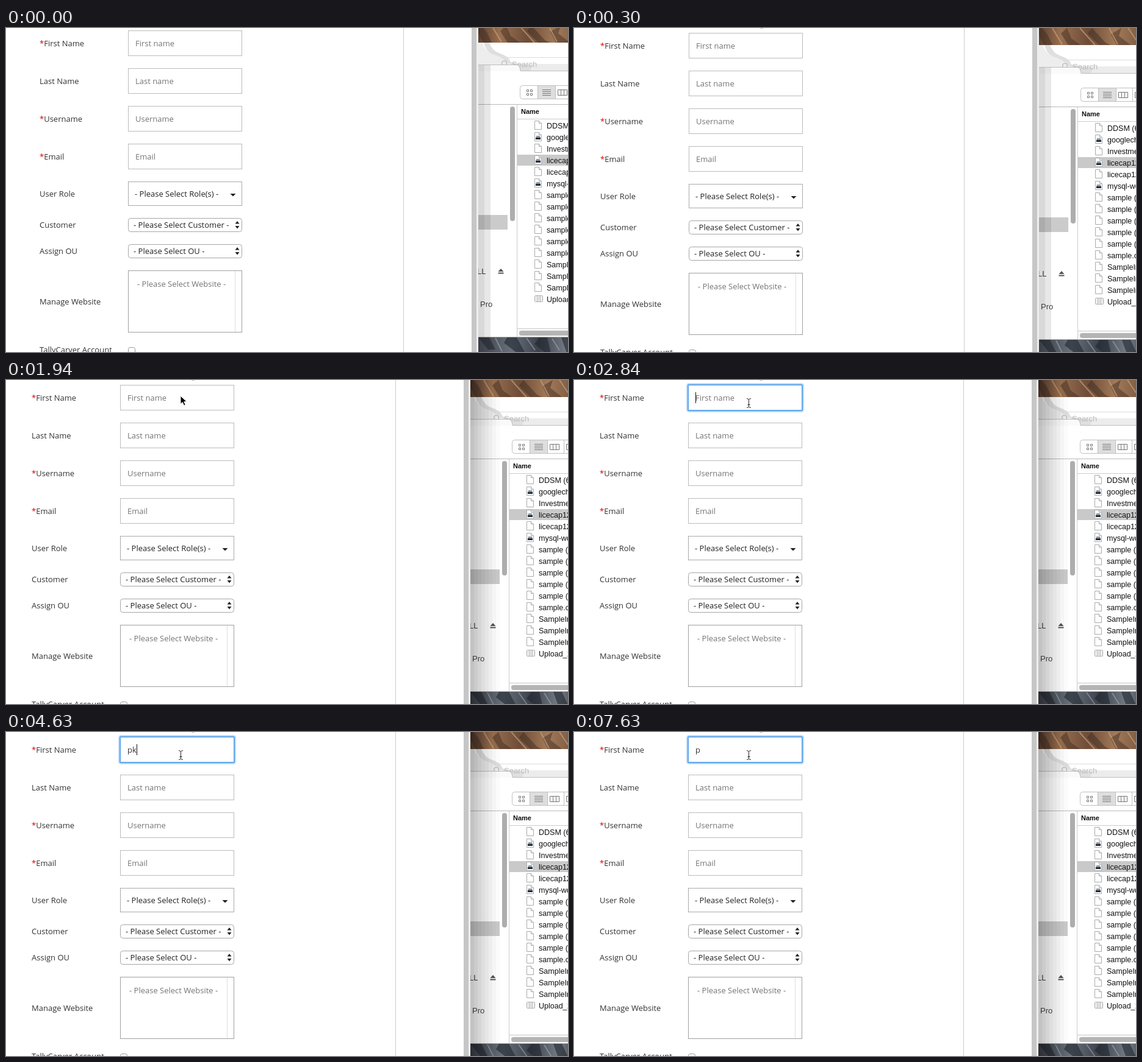
Animation of 921 by 532 pixels, one loop 8 s. Source, as an HTML page:

```html
<!DOCTYPE html>
<html lang="en">
<head>
<meta charset="utf-8">
<title>User form</title>
<style>
  html, body { margin: 0; width: 100%; height: 100%; overflow: hidden; background: #fff; }
  svg { display: block; width: 921px; height: 532px; }
  text { font: 13px "Open Sans", sans-serif; fill: #333; white-space: pre; }
  .hint { fill: #757575; }
  .dark { fill: #222; }
  .finder text { font: 12.5px "Liberation Sans", Arial, sans-serif; fill: #111; }
  .line { fill: none; stroke: #bcbcbc; }
  .anim { animation: 8s step-end infinite; }

  #scene { animation-name: settle; }
  @keyframes settle {
    0% { transform: translate(13px, -4px); }
    1.875% { transform: translate(2px, -1px); }
    3.75% { transform: translate(1px, 0); }
    13.125%, 100% { transform: none; }
  }
  #arrow { animation-name: approach; }
  @keyframes approach {
    0% { opacity: 0; transform: translate(296px, -5px); }
    18.75% { opacity: 1; transform: translate(296px, -5px); }
    20.625% { opacity: 1; transform: translate(289px, 17px); }
    22.5% { opacity: 1; transform: translate(285px, 25px); }
    29.875%, 100% { opacity: 0; transform: translate(285px, 25px); }
  }
  #beam { animation-name: beam; }
  @keyframes beam { 0% { opacity: 0; } 29.875%, 100% { opacity: 1; } }
  #ring { animation-name: ring; }
  @keyframes ring { 0% { opacity: 0; } 35.5%, 100% { opacity: 1; } }
  #idle { animation-name: idle; }
  @keyframes idle { 0% { opacity: 1; } 24.25%, 100% { opacity: 0; } }
  #active { animation-name: active; }
  @keyframes active { 0% { opacity: 0; } 24.25%, 100% { opacity: 1; } }

  #empty { animation-name: empty; }
  @keyframes empty { 0%, 78.5% { opacity: 1; } 56%, 87.875%, 100% { opacity: 0; } }
  #first { animation-name: first; }
  @keyframes first { 0%, 78.5% { opacity: 0; } 56%, 87.875%, 100% { opacity: 1; } }
  #second { animation-name: second; }
  @keyframes second { 0%, 71%, 100% { opacity: 0; } 57.875% { opacity: 1; } }
  #caret { animation-name: caret; }
  @keyframes caret {
    0%, 41.125%, 54.125%, 84.125% { opacity: 0; transform: none; }
    35.5%, 48.625%, 78.5% { opacity: 1; transform: none; }
    56%, 71%, 87.875% { opacity: 1; transform: translateX(8px); }
    57.875% { opacity: 1; transform: translateX(15px); }
    65.375%, 76.625%, 95.375%, 100% { opacity: 0; transform: none; }
  }
</style>
</head>
<body>
<svg viewBox="0 0 921 532">
  <defs>
    <linearGradient id="rock">
      <stop offset="0" stop-color="#5b4030"/><stop offset=".2" stop-color="#9a7050"/>
      <stop offset=".45" stop-color="#6d4c38"/><stop offset=".7" stop-color="#a27a58"/>
      <stop offset="1" stop-color="#70503c"/>
    </linearGradient>
    <linearGradient id="slate">
      <stop offset="0" stop-color="#3a3d45"/><stop offset=".3" stop-color="#69717c"/>
      <stop offset=".55" stop-color="#3b414b"/><stop offset=".8" stop-color="#747b85"/>
      <stop offset="1" stop-color="#40454e"/>
    </linearGradient>
    <g id="page">
      <path d="M.5 .5h7l4 4v10h-11z" fill="#fff" stroke="#aaa"/>
      <path d="M7.5 .5v4h4" fill="#eee" stroke="#aaa"/>
    </g>
    <g id="disk">
      <use href="#page"/>
      <path d="M3 6h6l1 4H2z" fill="#8b98a6"/><path d="M2 9h8v3H2z" fill="#222c38"/>
    </g>
    <g id="archive">
      <rect x=".5" y="2.5" width="13" height="10" rx="1" fill="#f0f0f0" stroke="#aaa"/>
      <path d="M4.5 3v9M7 4v7M9.5 3v9" stroke="#bbb"/>
    </g>
    <path id="steps" d="M-3.5 -2L0 -6.5L3.5 -2zM-3.5 1.5L0 6L3.5 1.5z" fill="#222"/>
  </defs>

  <g id="scene" class="anim">
    <g class="finder">
      <g>
        <rect x="761" y="-4" width="180" height="32" fill="url(#rock)"/>
        <path d="M766 0l9 11 8 17h-14l-8-16V0zM807 0l7 17 15 11h-20L797 9zM848 0l22 24 8 4h-19l-18-19zM896 0l-4 13 19 15h-23l-9-18z" fill="#3a2820" opacity=".45"/>
        <path d="M783 0l16 27M828 0l25 28M876 0l14 27M907 0l14 21" fill="none" stroke="#d0aa82" stroke-width="2" opacity=".6"/>
        <rect x="761" y="512" width="180" height="30" fill="url(#slate)"/>
        <path d="M761 512l16 20h12l-10-20zM808 512l-5 9 22 17h13l-14-26zM861 512l-8 11 19 15h8l-6-26zM897 512l9 26h17l-12-26z" fill="#20252d" opacity=".6"/>
        <path d="M789 513l11 22M840 513l14 20M882 514l12 19" fill="none" stroke="#a4abb3" stroke-width="2" opacity=".55"/>
      </g>

      <rect x="761" y="28" width="180" height="484" fill="#fff"/>
      <rect x="808" y="63" width="133" height="11" fill="#ececec"/>
      <path d="M761 28H768Q771 42 786 47Q801 50 808 60Q824 66 830 74H761z" fill="#ededed"/>
      <path d="M770 28H779Q784 42 797 46Q811 50 814 60Q832 64 850 65L846 74H830Q824 65 808 61Q799 50 784 47Q773 42 770 28z" fill="#dfdfdf"/>
      <path d="M808 52.5H941" stroke="#ddd"/>
      <circle cx="803.5" cy="62" r="4" fill="none" stroke="#aaa"/><path d="M806.5 65l3 4" stroke="#aaa"/>
      <text x="816" y="68" style="font-size:13px;fill:#bcbcbc">Search</text>
      <path d="M761 64.5H824Q829 65 830 74V130H761z" fill="#fafafa"/>
      <path d="M761 64.5H824Q829.500 65 830 74.500H941" class="line"/>
      <rect x="761" y="75" width="180" height="437" fill="#fff"/>

      <rect x="829.5" y="98.500" width="120" height="22" rx="4" fill="#fff" stroke="#c0c0c0"/>
      <path d="M858.500 99v21M887.500 99v21M914.500 99v21" stroke="#c0c0c0"/>
      <rect x="859" y="99" width="28" height="21" fill="#dedede"/>
      <path d="M840.500 105.500h3v3h-3zM846.500 105.500h3v3h-3zM840.500 111.500h3v3h-3zM846.500 111.500h3v3h-3zM891.500 105.500h15v9h-15zM896.500 105v10M901.500 105v10M918.500 105.500h9v9h-9z" fill="none" stroke="#777"/>
      <path d="M866 105.500h14M866 108.500h14M866 111.500h14M866 114.500h14" stroke="#777"/>

      <path d="M761 129.500H941" stroke="#b9b9b9"/>
      <path d="M824.500 130V512M825 153.500H941" stroke="#ccc"/>
      <text x="831" y="145" style="font-weight:bold;font-size:11px">Name</text>
      <rect x="813" y="133" width="8" height="188" rx="4" fill="#adadad"/>
      <rect x="761" y="311" width="48" height="24" fill="#cbcbcb"/>
      <text x="759" y="408" style="font-size:13px;fill:#443840">LL</text>
      <text x="764" y="462" style="font-size:13px;fill:#444">Pro</text>
      <path d="M793.500 404l4.500-5 4.500 5zM793.500 405.500h9v2h-9z" fill="#555"/>

      <rect x="825" y="212" width="116" height="18" fill="#c9c9c9"/>
      <g id="files"></g>
      <path d="M825 497.500H941" stroke="#ccc"/>
      <rect x="825" y="498" width="116" height="14" fill="#f7f7f7"/>
      <rect x="828" y="501" width="120" height="8" rx="4" fill="#b4b4b4"/>
      <path d="M761 511.500H941" stroke="#aaa"/>
    </g>

    <g id="idle" class="anim">
      <rect x="761" y="65" width="10" height="447" opacity=".15"/>
      <rect x="771" y="65" width="10" height="447" opacity=".09"/>
    </g>
    <g id="active" class="anim"></g>

    <rect x="-20" y="-10" width="781" height="560" fill="#fff"/>
    <path d="M638.5 -5V545" stroke="#ccc"/>
    <rect x="750" y="-5" width="8" height="550" fill="#c6c6c6"/>
    <path d="M759.5 -5V545" stroke="#eee" stroke-width="3"/>
    <path d="M304 0q3 2 6-.5" class="line"/>

    <g id="labels"></g>
    <g id="inputs"></g>
    <rect x="187.5" y="8.500" width="186" height="41" class="line"/>

    <rect x="187.5" y="256.500" width="186" height="39" class="line" style="stroke:#aaa"/>
    <text class="dark" x="198" y="281">- Please Select Role(s) -</text>
    <path d="M354.500 276h9l-4.500 4.500z" fill="#222"/>
    <g id="selects"></g>
    <rect x="187.5" y="402.500" width="186" height="101" class="line" style="stroke:#a0a0a0"/>
    <path d="M362.500 403v100" stroke="#ddd"/>
    <text class="hint" x="202" y="429">- Please Select Website -</text>
    <rect x="187.5" y="528.500" width="11" height="11" rx="3" fill="#fff" stroke="#999"/>

    <g id="ring" class="anim" fill="none">
      <rect x="185.500" y="6.500" width="190" height="45" rx="3" stroke="#a9d0f6" stroke-width="3" opacity=".75"/>
      <rect x="187" y="8" width="187" height="42" rx="1" stroke="#5ea6ec" stroke-width="2"/>
    </g>
    <text id="empty" class="hint anim" x="199" y="34">First name</text>
    <text id="first" class="anim" x="199" y="34">p</text>
    <text id="second" class="anim" x="207" y="34">k</text>
    <rect id="caret" class="anim" x="199" y="20" width="1" height="18" fill="#111"/>
  </g>

  <path id="arrow" class="anim" d="M1 1V14.500L4.300 11.500L6.700 17L9.200 16L6.800 10.700H11.300z" fill="#000" stroke="#fff"/>
  <g id="beam" class="anim" fill="none">
    <path id="stem" d="M283 30.500q3 0 3.500 2q.5-2 3.500-2M286.500 32v12M283 45.500q3 0 3.500-2q.5 2 3.500 2M284.500 40.500h4" stroke="#fff" stroke-width="2.500"/>
    <use href="#stem"/>
    <path d="M283 30.500q3 0 3.500 2q.5-2 3.500-2M286.500 32v12M283 45.500q3 0 3.500-2q.5 2 3.500 2M284.500 40.500h4" stroke="#222"/>
  </g>
</svg>
<script>
  const fill = (id, items, draw) => {
    document.getElementById(id).innerHTML = items.map(draw).join('');
  };

  fill('labels', [
    ['*First Name', 34], ['Last Name', 96], ['*Username', 158], ['*Email', 220],
    ['User Role', 281], ['Customer', 332], ['Assign OU', 375],
    ['Manage Website', 458], ['TallyCarver Account', 537]
  ], ([label, y]) =>
    `<text x="42" y="${y}">${label.replace('*', '<tspan fill="#e00000">*</tspan>')}</text>`);

  fill('inputs', ['Last name', 'Username', 'Email'], (hint, i) => {
    const y = 70 + 62 * i;
    return `<rect class="line" x="187.5" y="${y + .5}" width="186" height="41"/>
      <text class="hint" x="199" y="${y + 26}">${hint}</text>`;
  });

  fill('selects', ['Customer', 'OU'], (name, i) => {
    const y = 316 + 43 * i;
    return `<rect class="line" style="stroke:#a6a6a6" x="187.5" y="${y + .5}" width="186" height="22" rx="4"/>
      <text class="dark" x="196" y="${y + 16}">- Please Select ${name} -</text>
      <use href="#steps" x="366" y="${y + 11.5}"/>`;
  });

  const files = [
    'DDSM (6)', 'googlechrome', 'Investment', 'licecap123', 'licecap123', 'mysql-workbench',
    'sample (1)', 'sample (2)', 'sample (3)', 'sample (4)', 'sample (5)', 'sample.csv',
    'SampleIn', 'SampleIn', 'SampleIn', 'Upload_1'
  ];
  const disks = [1, 3, 5];
  fill('files', files, (name, i) => {
    const y = 164 + 19 * i;
    const icon = disks.includes(i) ? 'disk' : name.startsWith('Upload') ? 'archive' : 'page';
    return `<use href="#${icon}" x="853" y="${y - 8}"/><text x="873" y="${y + 5}">${name}</text>`;
  });

  // Banded window shadow, fading to the right.
  fill('active', [...Array(8).keys()], i =>
    `<rect x="${761 + 6 * i}" y="0" width="6" height="540" opacity="${.24 * (1 - i / 8) ** 1.3}"/>`);
</script>
</body>
</html>
```
